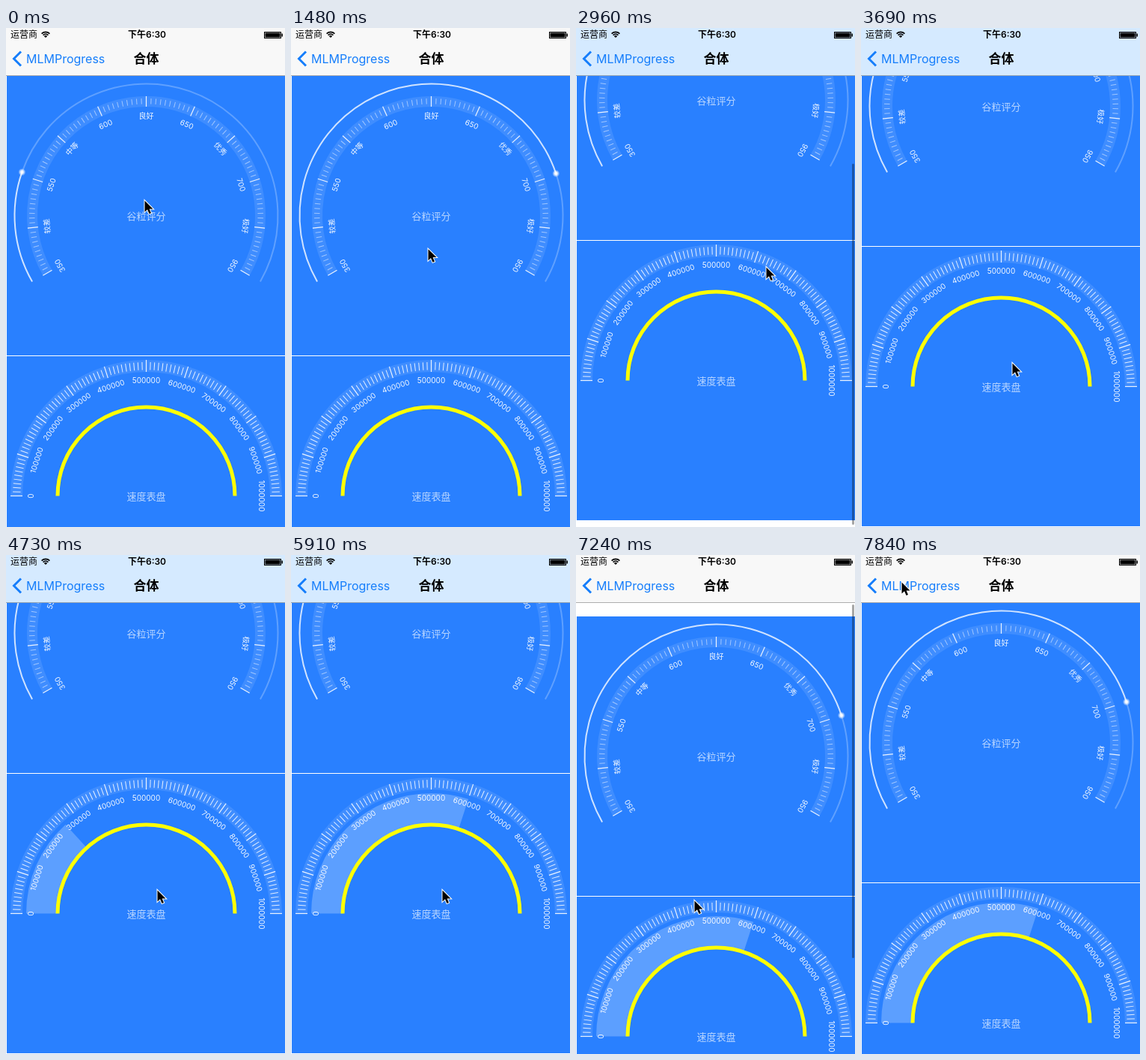
An HTML page with a canvas for the animation above (7990 ms loop, 373 by 666 pixels).

```html
<!DOCTYPE html>
<html lang="zh-CN">
<head>
<meta charset="utf-8">
<style>
html, body { margin: 0; width: 373px; height: 666px; overflow: hidden; background: #fff; }
canvas { display: block; }
</style>
</head>
<body>
<canvas id="stage" width="373" height="666"></canvas>
<script>
const ctx = document.getElementById('stage').getContext('2d');
const W = 373, H = 666, LOOP = 7990, STEPS = 54, BAR = 64;
const MAX_SCROLL = 146, CX = 187.5;
const FONT = 'Inter, "Noto Sans CJK SC", "Noto Sans CJK", sans-serif';
const BLUE = '#2980ff', LINK = '#167efb';
const rad = deg => deg * Math.PI / 180;
const white = a => `rgba(255,255,255,${a})`;
const clamp = (v, lo, hi) => Math.min(hi, Math.max(lo, v));

// Key points: [step, value, ...]
const scrollKeys = [[13, 0], [14, 10], [15, 28], [16, 50], [17, 92], [18, 132], [19, 152], [20, 154],
  [21, 150], [22, 147], [23, 146], [43, 146], [44, 120], [45, 40], [46, -42], [47, -63],
  [48, -40], [49, -18], [50, -7], [51, -2], [52, 0]];
const thumbKeys = [[13, 0], [14, 1], [22, 1], [24, 0], [43, 0], [44, 1], [50, 1], [52, 0]];
const pointerKeys = [[0, 185, 230], [8, 183, 262], [11, 183, 311], [13, 183, 311], [16, 183, 261],
  [18, 190, 170], [20, 254, 319], [22, 215, 420], [24, 165, 467], [25, 202, 447], [42, 202, 447],
  [43, 185, 320], [44, 165, 215], [45, 162, 300], [46, 160, 420], [47, 158, 461], [49, 158, 461],
  [51, 120, 330], [52, 80, 150], [53, 54, 36]];

function at(keys, step) {
  const i = keys.findIndex(k => k[0] >= step);
  if (i < 0) return keys[keys.length - 1].slice(1);
  if (i === 0) return keys[0].slice(1);
  const a = keys[i - 1], b = keys[i], p = (step - a[0]) / (b[0] - a[0]);
  return a.slice(1).map((v, j) => v + (b[j + 1] - v) * p);
}

function text(str, x, y, size, color, weight = 400, align = 'center') {
  ctx.font = `${weight} ${size}px ${FONT}`;
  ctx.textAlign = align;
  ctx.fillStyle = color;
  ctx.fillText(str, x, y + size * 0.37);
}

function arc(r, from, to, width, color, x = 0, y = 0) {
  ctx.beginPath();
  ctx.arc(x, y, r, rad(from), rad(to));
  ctx.lineWidth = width;
  ctx.strokeStyle = color;
  ctx.stroke();
}

function line(points, width, color) {
  ctx.beginPath();
  points.forEach(p => ctx.lineTo(...p));
  ctx.lineWidth = width;
  ctx.strokeStyle = color;
  ctx.stroke();
}

// Scale band with 10 labelled divisions of 10 ticks each
function dial({ start, sweep, outer, inner, tickOut, tickIn, tick, labelR, labels }) {
  arc((outer + inner) / 2, start, start + sweep, outer - inner, white(0.1));
  for (let i = 0; i <= 100; i++) {
    const major = i % 10 === 0;
    ctx.save();
    ctx.rotate(rad(start + sweep * i / 100 + 90));
    line([[0, -(major ? outer : tickOut)], [0, -(major ? inner : tickIn)]],
      major ? 1.2 : 1, white(major ? 0.9 : tick));
    if (major) text(labels[i / 10], 0, -labelR, 10, white(0.95));
    ctx.restore();
  }
}

const credit = {
  start: 150, sweep: 240, outer: 159.5, inner: 145.5, tickOut: 156.5, tickIn: 149, tick: 0.5, labelR: 133.5,
  labels: ['350', '较差', '550', '中等', '600', '良好', '650', '优秀', '700', '极好', '950']
};
const speed = {
  start: 180, sweep: 180, outer: 181.5, inner: 165.5, tickOut: 178.5, tickIn: 168, tick: 0.85, labelR: 154,
  labels: Array.from({ length: 11 }, (_, i) => String(i * 100000))
};

function creditGauge(ms) {
  const end = 150 + Math.min(192, 49.3 + 0.096 * ms);
  dial(credit);
  arc(176, end, 390, 2, white(0.25));
  arc(176, 150, end, 2, white(0.78));
  const x = 176 * Math.cos(rad(end)), y = 176 * Math.sin(rad(end));
  const glow = ctx.createRadialGradient(x, y, 0, x, y, 5);
  glow.addColorStop(0, '#fff');
  glow.addColorStop(0.35, white(0.9));
  glow.addColorStop(1, white(0));
  ctx.fillStyle = glow;
  ctx.fillRect(x - 5, y - 5, 10, 10);
  text('谷粒评分', 0, 0.5, 13, white(0.68));
}

function speedGauge(ms) {
  const turn = 108 * clamp((ms - 3850) / 2000, 0, 1);
  if (turn) arc(139.25, 180, 180 + turn, 42.5, white(0.24));
  dial(speed);
  arc(118.5, 180, 360, 5, '#ff0');
  text('速度表盘', 0, 0.5, 13, white(0.68));
}

function content(scroll, ms) {
  ctx.save();
  ctx.translate(0, -scroll);
  ctx.fillStyle = BLUE;
  ctx.fillRect(1, 64, W - 1, 747);
  ctx.fillStyle = '#fff';
  ctx.fillRect(1, 437, W - 1, 1);
  for (const [y, gauge] of [[250.5, creditGauge], [624.5, speedGauge]]) {
    ctx.save();
    ctx.translate(CX, y);
    gauge(ms);
    ctx.restore();
  }
  ctx.restore();
}

function scrollThumb(scroll, alpha) {
  const inside = clamp(scroll, 0, MAX_SCROLL);
  const over = scroll - inside;
  const top = 66 + inside * 0.733 + Math.max(0, over);
  ctx.fillStyle = `rgba(0,0,0,${0.35 * alpha})`;
  ctx.beginPath();
  ctx.roundRect(369, top, 3, 490 - Math.abs(over), 1.5);
  ctx.fill();
}

function navBar(scroll) {
  const edge = BAR - scroll;
  const fill = ctx.createLinearGradient(0, edge, 0, edge + 24);
  fill.addColorStop(0, '#f8f8f8');
  fill.addColorStop(1, scroll > 0 ? '#d5eaff' : '#f8f8f8');
  ctx.fillStyle = fill;
  ctx.fillRect(0, 0, W, BAR);
  ctx.fillStyle = 'rgba(0,0,0,.3)';
  ctx.fillRect(0, BAR - 1, W, 1);

  text('运营商', 6, 9, 12, '#000', 400, 'left');
  text('下午6:30', 188.5, 9, 12, '#000', 600);
  arc(7.6, -135, -45, 1.7, '#000', 53, 13);
  arc(4.8, -135, -45, 1.7, '#000', 53, 13);
  arc(1.5, -135, -45, 3, '#000', 53, 13);
  ctx.lineWidth = 1;
  ctx.strokeStyle = ctx.fillStyle = '#000';
  ctx.strokeRect(345.5, 5.5, 22, 8);
  ctx.fillRect(346.5, 6.5, 20, 6);
  ctx.fillRect(368.5, 7.5, 1.5, 4);

  line([[20, 31.5], [10.5, 41], [20, 50.5]], 3, LINK);
  text('MLMProgress', 27, 41, 16, LINK, 400, 'left');
  text('合体', CX, 41, 17, '#000', 700);
}

function pointer(x, y) {
  ctx.save();
  ctx.translate(x, y);
  ctx.beginPath();
  [[0.5, 0.5], [0.5, 15.5], [4, 12.3], [6.5, 18], [9, 17], [6.6, 11.4], [11.5, 11.4]]
    .forEach(p => ctx.lineTo(...p));
  ctx.closePath();
  ctx.lineWidth = 2;
  ctx.strokeStyle = '#fff';
  ctx.stroke();
  ctx.fillStyle = '#000';
  ctx.fill();
  ctx.restore();
}

function draw(now) {
  const step = Math.floor((now % LOOP) / LOOP * STEPS + 0.08) % STEPS;
  const ms = step * LOOP / STEPS;
  const [scroll] = at(scrollKeys, step);
  ctx.fillStyle = '#fff';
  ctx.fillRect(0, 0, W, H);
  content(scroll, ms);
  scrollThumb(scroll, at(thumbKeys, step)[0]);
  navBar(scroll);
  pointer(...at(pointerKeys, step));
}

const begin = performance.now();
function tick() {
  draw(performance.now() - begin);
  requestAnimationFrame(tick);
}
tick();
</script>
</body>
</html>
```
